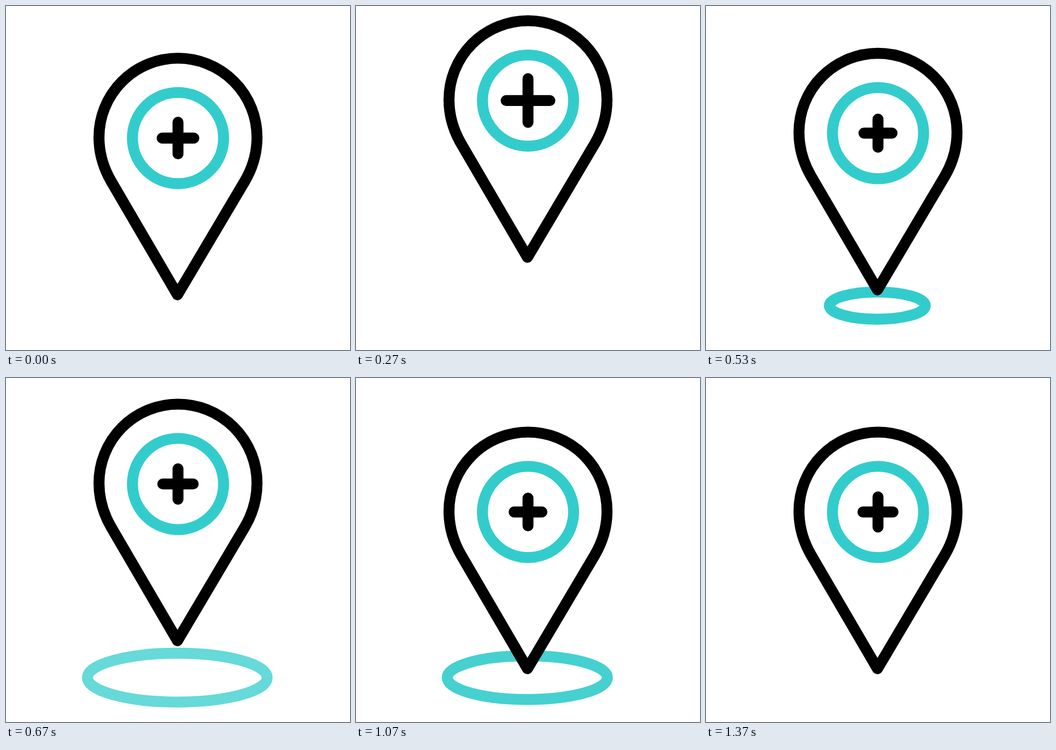
An HTML page for the animation above (1.67 s loop, 640 by 640 pixels).

```html
<!DOCTYPE html>
<html lang="en">
<head>
<meta charset="utf-8">
<title>Add location</title>
<style>
  html, body { margin: 0; width: 100%; height: 100%; overflow: hidden; background: #fff; }
  svg { display: block; width: 100%; height: 100%; fill: none; stroke-width: 20.4; stroke-linecap: round; stroke-linejoin: round; }
  .teal { stroke: #3cc; }
  .dark { stroke: #000; }
</style>
</head>
<body>
<svg viewBox="0 0 640 640">
  <ellipse class="teal ripple" cx="318.7" cy="557.4"/>
  <ellipse class="teal ripple" cx="318.7" cy="557.4"/>
  <g id="pin">
    <path class="dark" fill="#fff" d="M319 540.8L195.3 329C181.5 305 173 277 173 247.6A147 147 0 0 1 467 247.6C467 277 458.5 305 444.5 329Z"/>
    <circle class="teal" cx="320" cy="249.2" r="84.8"/>
    <path id="plus" class="dark"/>
  </g>
</svg>
<script>
const LOOP = 1670, FPS = 30;
const pin = document.getElementById('pin');
const plus = document.getElementById('plus');
const ripples = document.querySelectorAll('.ripple');

// Keys are [frame, value] pairs
const lift = [[-1.16, 0], [7.65, -74], [13.8, 0], [20.8, -54], [27, 0]];
const arm = [[-1.16, 28], [5.64, 46.8], [12.5, 24.3], [19.5, 28], [26.2, 46.8], [33.1, 24.3], [40.4, 28]];
const rippleStarts = [10, 23.05];

const clamp = x => Math.min(1, Math.max(0, x));
const smooth = x => x * x * (3 - 2 * x);

function ease(keys, frame) {
  let value = keys[0][1];
  for (let i = 1; i < keys.length; i++) {
    const [from, a] = keys[i - 1], [to, b] = keys[i];
    if (frame >= from) value = a + (b - a) * smooth(clamp((frame - from) / (to - from)));
  }
  return value;
}

function drawRipple(ring, age) {
  const grow = smooth(clamp(age / 13.5));
  ring.setAttribute('rx', 11 + 187.5 * grow);
  ring.setAttribute('ry', 5.1 + 48.4 * grow);
  ring.setAttribute('opacity', Math.min(clamp((age - 0.75) / 5), clamp((15 - age) * 0.15)));
}

function draw(now) {
  const frame = Math.floor((now % LOOP + 5) * FPS / 1000);
  pin.setAttribute('transform', `translate(0 ${ease(lift, frame)})`);
  const h = ease(arm, frame);
  plus.setAttribute('d', `M${320 - h} 249.2h${2 * h}M320 ${249.2 - h}v${2 * h}`);
  ripples.forEach((ring, i) => drawRipple(ring, frame - rippleStarts[i]));
}

const start = performance.now();
function tick() {
  draw(performance.now() - start);
  requestAnimationFrame(tick);
}
tick();
</script>
</body>
</html>
```
